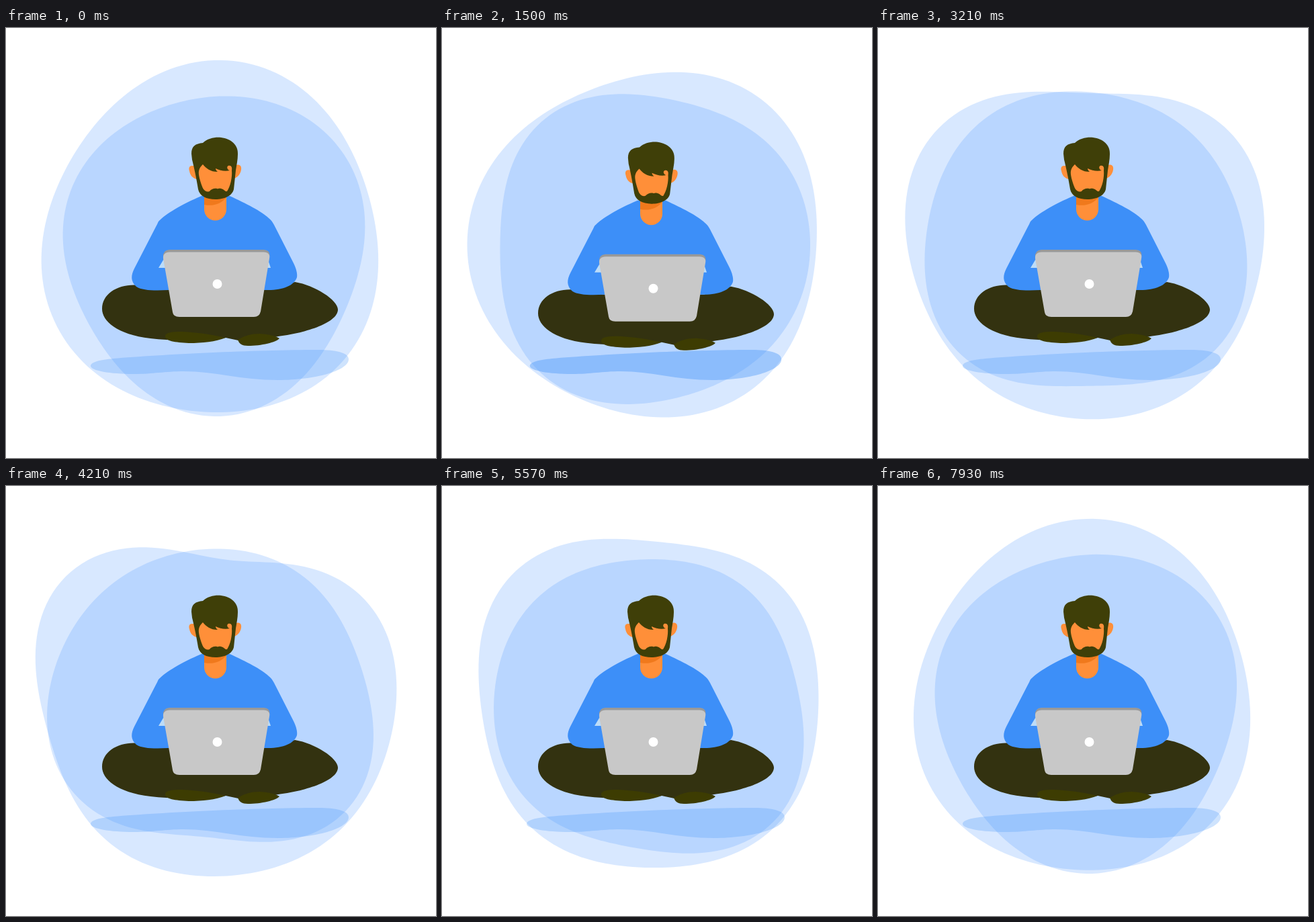
An HTML page with a canvas that plays this animation: 640 by 640 pixels, repeating every 8 s.

```html
<!DOCTYPE html>
<html lang="en">
<head>
<meta charset="utf-8">
<title>Floating worker</title>
<style>
html, body { margin: 0; width: 100%; height: 100%; overflow: hidden; background: #fff; }
canvas { display: block; width: 100vmin; height: 100vmin; }
</style>
</head>
<body>
<canvas id="stage"></canvas>
<script>
const SIZE = 640, LOOP = 8000, FLOAT = 2000;
const BLUE = '#3d8ff8', GLOW = '#3c8eff', HAIR = '#3f3f08', SKIN = '#ff8f39', SHOE = '#3d3c02';
const CENTER = { x: 310, y: 320 };
const TAU = 2 * Math.PI;
const canvas = document.getElementById('stage');
const ctx = canvas.getContext('2d');
const ratio = window.devicePixelRatio || 1;
canvas.width = canvas.height = SIZE * ratio;

// Evenly spaced poses of each blob: radii in eight directions,
// clockwise from the right. A smooth wave runs through them.
const outer = [
  [243, 260, 252, 263, 256, 250, 272, 253],
  [249, 263, 261, 258, 278, 253, 245, 275],
  [274, 269, 263, 260, 260, 286, 209, 258],
  [244, 262, 244, 258, 251, 276, 246, 258]
];
const inner = [
  [223, 229, 258, 228, 225, 222, 218, 233],
  [243, 238, 231, 259, 223, 249, 219, 225],
  [233, 252, 201, 241, 250, 233, 229, 227],
  [220, 258, 228, 231, 228, 225, 206, 218]
];

const shape = d => new Path2D(d);
const shadow = shape('M126 503C126 497 140 494 160 492C230 486 370 479 465 479C490 479 510 483 510 493C510 510 460 524 405 524C350 524 310 511 265 511C235 511 220 515 190 515C155 515 126 510 126 503Z');
const legs = shape('M143 418C143 395 168 380 198 383L240 390H390L430 378C460 383 494 405 494 419C494 440 440 455 405 459L360 468L327 461C290 465 250 466 215 462C165 456 143 436 143 418Z');
const leftShoe = shape('M237 458C238 453 247 452 262 452C285 453 305 456 327 461C312 467 292 469 272 469C252 468 236 466 237 458Z');
const rightShoe = shape('M345 464C355 458 365 455 378 455C392 456 403 459 407 462C402 468 380 473 360 473C351 473 347 470 345 464Z');
const shirt = shape('M291 250C262 262 236 278 229 286C226 288 226 291 224 294L191 358C186 368 185 377 194 385C203 391 222 391 242 390H386C410 391 429 384 433 371C434 366 432 358 428 350L401 297C398 291 396 287 391 283C381 273 357 261 333 250Z');
const gaps = shape('M236 342L227 357H239ZM389 342L394 357H388Z');
const neck = shape('M295 245H328V270A16.5 16.5 0 0 1 295 270Z');
const neckShade = shape('M295 245H328V252C321 261 309 266 295 263Z');
const ears = shape('M282 206C274 203 271 207 273 213C274 219 278 224 284 225ZM341 205C348 201 351 206 350 211C349 218 344 223 339 224Z');
const hair = shape('M276 187C276 176 282 172 293 171C300 164 312 162 320 163C335 165 346 174 345 188C345 196 343 205 342 212L339 240C337 250 324 255 312 255C298 255 288 250 286 240C283 222 280 208 277 196Z');
const face = shape('M293 203C298 209 304 214 315 214C313 212 312 211 312 209C318 212 326 214 333 212C329 211 328 206 331 205C335 204 337 207 336 212C337 222 334 236 329 243C326 244 325 240 320 239C317 238 315 240 314 239C310 238 305 240 303 243C299 245 294 242 292 236C289 228 286 218 287 213C288 208 290 206 293 203Z');
const lidEdge = shape('M243 330H384Q394 331 392 341L388 360H238L234 341Q233 331 243 330Z');
const lid = shape('M244 333.5H383Q394 334 392 343L379 422Q377 430 369 430H258Q249 430 248 423L234 343Q233 334 244 333.5Z');
const badge = shape('M321.5 381A7 7 0 1 1 307.5 381A7 7 0 1 1 321.5 381Z');

function fill(path, color) {
  ctx.fillStyle = color;
  ctx.fill(path);
}

function radiiAt(poses, t) {
  const phase = t / LOOP * poses.length;
  const i = Math.floor(phase);
  const next = poses[(i + 1) % poses.length];
  return poses[i].map((r, k) => r + (next[k] - r) * (phase - i));
}

// Trigonometric interpolation through evenly spaced radii.
function radius(radii, angle) {
  const n = radii.length;
  return radii.reduce((sum, r, k) => {
    const d = angle - k * TAU / n;
    const weight = Math.abs(Math.sin(d / 2)) < 1e-6
      ? 1
      : Math.sin(n * d / 2) / (n * Math.tan(d / 2));
    return sum + r * weight;
  }, 0);
}

function drawBlob(poses, t) {
  const radii = radiiAt(poses, t);
  const steps = 180;
  ctx.beginPath();
  for (let i = 0; i < steps; i++) {
    const angle = i / steps * TAU;
    const r = radius(radii, angle);
    ctx.lineTo(CENTER.x + r * Math.cos(angle), CENTER.y + r * Math.sin(angle));
  }
  ctx.closePath();
  ctx.globalAlpha = 0.2;
  ctx.fillStyle = GLOW;
  ctx.fill();
  ctx.globalAlpha = 1;
}

function drawShadow(dip) {
  ctx.save();
  ctx.translate(318, 0);
  ctx.scale(1 - 0.05 * dip, 1);
  ctx.translate(-318, 0);
  ctx.globalAlpha = 0.25 + 0.25 * dip;
  fill(shadow, BLUE);
  ctx.restore();
}

function drawHead(dip) {
  ctx.save();
  ctx.translate(312, 255);
  ctx.rotate(0.025 * dip);
  ctx.translate(-312, -255);
  fill(ears, SKIN);
  fill(hair, HAIR);
  fill(face, SKIN);
  ctx.restore();
}

function drawMan(dip) {
  ctx.save();
  ctx.translate(0, 13.4 * dip);
  fill(legs, '#333210');
  fill(leftShoe, SHOE);
  fill(rightShoe, SHOE);
  fill(shirt, BLUE);
  fill(gaps, '#bcdcf8');
  fill(neck, SKIN);
  fill(neckShade, '#f0791c');
  drawHead(dip);
  fill(lidEdge, '#999');
  fill(lid, '#c8c8c8');
  fill(badge, '#fff');
  ctx.restore();
}

function draw(now) {
  const t = now % LOOP;
  const dip = t < FLOAT ? (1 - Math.cos(TAU * t / FLOAT)) / 2 : 0;
  ctx.setTransform(ratio, 0, 0, ratio, 0, 0);
  ctx.fillStyle = '#fff';
  ctx.fillRect(0, 0, SIZE, SIZE);
  drawBlob(outer, t);
  drawBlob(inner, t);
  drawShadow(dip);
  drawMan(dip);
}

const start = performance.now();
function tick() {
  draw(performance.now() - start);
  requestAnimationFrame(tick);
}
tick();
</script>
</body>
</html>
```
